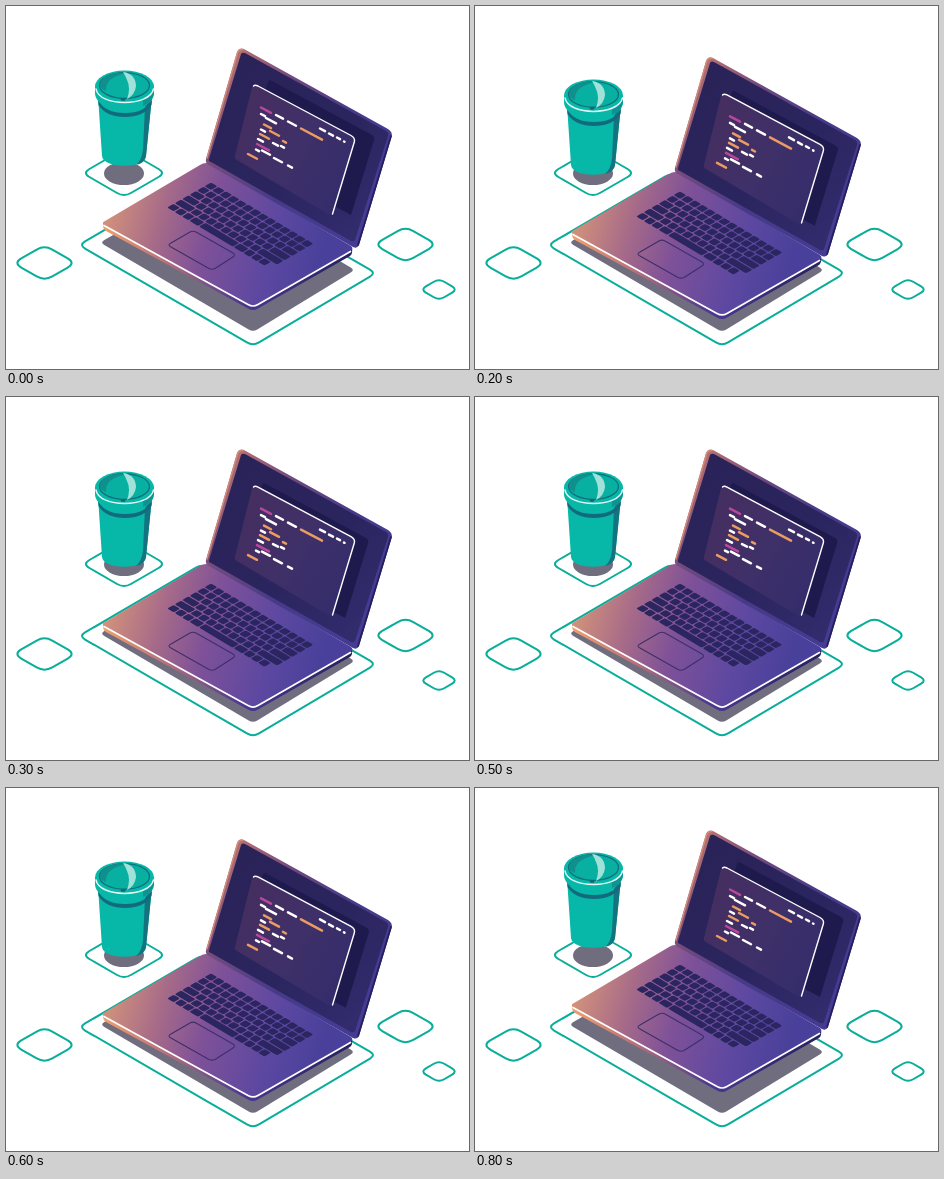
Recreate the animation shown at these times as an HTML page. Size 463 px wide and 363 px high, loop 900 ms.

```html
<!DOCTYPE html>
<html lang="en">
<head>
<meta charset="utf-8">
<title>Floating laptop and cup</title>
<style>
  html, body { margin: 0; width: 100%; height: 100%; overflow: hidden; background: #fff; }
  svg { display: block; width: 100%; height: 100%; }
</style>
</head>
<body>
<svg viewBox="0 0 463 363" fill="none" stroke-linecap="round" stroke-linejoin="round">
  <defs>
    <linearGradient id="deck" gradientUnits="userSpaceOnUse" x1="105" y1="205" x2="315" y2="262">
      <stop offset="0" stop-color="#cf8f7c"/>
      <stop offset=".22" stop-color="#a86c88"/>
      <stop offset=".45" stop-color="#7f5198"/>
      <stop offset=".75" stop-color="#5d48a1"/>
      <stop offset="1" stop-color="#48409a"/>
    </linearGradient>
    <linearGradient id="side" gradientUnits="userSpaceOnUse" x1="97" y1="0" x2="346" y2="0">
      <stop offset="0" stop-color="#f0a06c"/>
      <stop offset=".25" stop-color="#b9707c"/>
      <stop offset=".55" stop-color="#4c3890"/>
      <stop offset="1" stop-color="#262060"/>
    </linearGradient>
    <linearGradient id="lid" gradientUnits="userSpaceOnUse" x1="220" y1="60" x2="365" y2="185">
      <stop offset="0" stop-color="#b57072"/>
      <stop offset=".3" stop-color="#70497f"/>
      <stop offset=".65" stop-color="#463a88"/>
      <stop offset="1" stop-color="#453b92"/>
    </linearGradient>
    <linearGradient id="screen" gradientUnits="userSpaceOnUse" x1="215" y1="70" x2="350" y2="220">
      <stop offset="0" stop-color="#2a2358"/>
      <stop offset=".6" stop-color="#2b255f"/>
      <stop offset="1" stop-color="#322b6c"/>
    </linearGradient>
    <linearGradient id="card" gradientUnits="userSpaceOnUse" x1="235" y1="110" x2="340" y2="175">
      <stop offset="0" stop-color="#452e60"/>
      <stop offset=".5" stop-color="#3f3068"/>
      <stop offset="1" stop-color="#352d6b"/>
    </linearGradient>
  </defs>

  <g id="mats" stroke="#09ae9a" stroke-width="2"></g>
  <path id="shadow" fill="#706e7e"/>
  <ellipse cx="118" cy="167.500" rx="20" ry="11.500" fill="#706e7e"/>

  <g id="cup">
    <path d="M92 90L96 150C97 163 139 163 140 150L146 90Z" fill="#07b8a8"/>
    <path d="M146 90L140 150Q139 157 130 159Q136 154 137 143L139 101Z" fill="#13737f"/>
    <path d="M92 94Q99 107 119 107T146 94L145.500 99Q138 111 119 111T92.500 99Z" fill="#126b7c"/>
    <path d="M89 80V87C89 109 148 109 148 87V80Z" fill="#07b8a8"/>
    <path d="M148 80V87Q147 96 137 100V94Q146 89 148 80Z" fill="#0d9492"/>
    <ellipse cx="118.500" cy="80.500" rx="29.500" ry="16" fill="#07b8a8"/>
    <path d="M90 83C93 101 144 101 147.500 83" stroke="#e4f7f3" stroke-width="1.500"/>
    <ellipse cx="118.500" cy="79.500" rx="25" ry="12.800" fill="#07b0a1" stroke="#126f7c" stroke-width="1.300"/>
    <path d="M94 80C94 68 112 66 121 67Q99 71 100 85Q95 83 94 80Z" fill="#118f8d"/>
    <path d="M117 66C126 67 130 73 130 80Q129 89 121 93Q125 82 121 74Q119 69 117 66Z" fill="#a0e2da"/>
    <ellipse cx="117" cy="93.500" rx="2.500" ry="1.200" fill="#126672"/>
  </g>

  <g id="laptop">
    <path d="M97 216V220Q97 223 100 225L242 302.500Q247 305.500 252 302.500L344 250Q347 248 346 241Z" fill="url(#side)"/>
    <path d="M99 215L194 159Q200 155 206 159L345 240Q348 243 344 245L252 298Q247 301 242 298L99 220Q95 217 99 215Z" fill="url(#deck)"/>
    <path d="M98 219.500L242 298.500Q247 301.500 252 298.500L344.500 245.500" stroke="#fff" stroke-width="1.700"/>
    <path d="M184 226Q187 224.500 190 226L227 247Q230 249 227 251L209 262.500Q206 264 203 262.500L165 241Q161 239 165 237Z" stroke="#3d2f69" stroke-width="1.100"/>
    <g id="keys" transform="matrix(.858 .513 -.868 .497 205 176.500)" fill="#2b2560"></g>

    <path d="M200 153L231 46Q233 41 238 43L382 123Q387 126 385.500 131L353 239Q351 243 347 241L203 159Q199 157 200 153Z" fill="url(#lid)"/>
    <path d="M203 153L235 48Q236 46 239 47L380 125Q383 127 382 130L349 234Q348 236 345 235L205 156Q202 155 203 153Z" fill="url(#screen)"/>
    <path d="M201 152L231.500 47Q233 43 237 43.500" stroke="#d28b76" stroke-width="1.400"/>
    <path d="M385 130L352 239" stroke="#241f5e" stroke-width="1.800"/>
    <path id="shade" d="M256 78Q257 75 260 77L360 131Q363 133 362 136L339 211L233 155Z" fill="#1f1a4d"/>
    <path d="M229 150L246 81.500Q248 78 251 79.500L345 129.500Q350 132 348.500 136L327 206Q326 210 322 208L231 154Q228 152 229 150Z" fill="url(#card)"/>
    <path d="M247.500 80Q249 78.500 252 80L345 129.500Q349.500 132 348.300 136L326.500 208" stroke="#fff" stroke-width="1.400"/>
    <g id="code" transform="translate(0 -1)" stroke-width="2.500"></g>
  </g>
</svg>
<script>
const byId = id => document.getElementById(id);

function add(parent, tag, attributes) {
  const node = document.createElementNS("http://www.w3.org/2000/svg", tag);
  for (const name in attributes) node.setAttribute(name, attributes[name]);
  byId(parent).append(node);
}

// Rounded polygon: each corner is cut at a fixed distance and smoothed.
function roundedPath(points, radius) {
  const toward = (a, b) => {
    const k = radius / Math.hypot(b[0] - a[0], b[1] - a[1]);
    return [a[0] + (b[0] - a[0]) * k, a[1] + (b[1] - a[1]) * k];
  };
  return points.map((p, i) => {
    const before = points.at(i - 1), after = points[(i + 1) % points.length];
    return `${i ? "L" : "M"}${toward(p, before)}Q${p} ${toward(p, after)}`;
  }).join("") + "Z";
}

const diamond = (x, y, w, h) => [[x - w, y], [x, y - h], [x + w, y], [x, y + h]];
const mats = [
  [[[73, 239], [196, 167], [370, 267], [247, 340]], 7],
  [diamond(118, 167, 41.5, 24), 8],
  [diamond(38.5, 257, 31, 18), 9],
  [diamond(399.5, 238.5, 31, 18), 9],
  [diamond(433, 283.5, 18.3, 10.8), 6]
];
for (const [points, radius] of mats) add("mats", "path", { d: roundedPath(points, radius) });
byId("shadow").setAttribute("d", roundedPath([[94, 236.5], [200, 176], [349, 264], [247, 326]], 5));

// Key widths per row, in units of one standard key.
const ones = n => Array(n).fill(1);
const keyRows = [
  ones(14),
  ones(14),
  [1.4, ...ones(11), 1.6],
  [1.7, ...ones(10), 2.3],
  [2.1, ...ones(9), 2.9],
  [1, 1, 1, 1.3, 4.7, 1.3, 1, 1, 1]
];
const KEY = 8.6, ROW = 8.6, GAP = 1.2;
keyRows.forEach((widths, row) => {
  let x = 0;
  for (const width of widths) {
    add("keys", "rect", { x, y: row * ROW, width: width * KEY - GAP, height: ROW - GAP, rx: 1.5 });
    x += width * KEY;
  }
});

const palette = { w: "#fff", o: "#ea9c62", p: "#b9479c" };
const dashes = [
  ["p", 255, 102.5, 10], ["w", 270, 110, 7], ["w", 282, 116.5, 8], ["o", 295, 123.5, 21],
  ["w", 314, 123.5, 5], ["w", 323, 128.5, 4], ["w", 331, 132.5, 3], ["w", 338, 136.5, .5],
  ["w", 255, 109, 4], ["w", 260, 113, 10],
  ["o", 258, 119.5, 7], ["o", 264, 126, 9], ["o", 277, 136, 3],
  ["w", 255, 124.5, 4], ["o", 254, 129, 9], ["w", 267, 138, 5],
  ["w", 252, 134, 5], ["p", 251, 139, 12], ["w", 275, 141, 3],
  ["w", 250, 144.5, 3], ["w", 256, 145.5, 8], ["w", 268, 153, 8], ["w", 282, 160.5, 4],
  ["o", 242, 149, 9]
];
for (const [color, x, y, length] of dashes) {
  add("code", "path", { d: `M${x} ${y}l${length} ${length * .53}`, stroke: palette[color] });
}

const STEP = 100, STEPS = 9, DROP = 10.2;

function draw() {
  const step = Math.floor(performance.now() / STEP) % STEPS;
  const progress = 1 - Math.abs(step - 4) / 4;
  const eased = 1 - (1 - progress) ** 3;
  const drop = `translate(0 ${DROP * eased})`;
  byId("cup").setAttribute("transform", drop);
  byId("laptop").setAttribute("transform", drop);
  byId("shade").setAttribute("transform", `translate(${6 * (1 - eased)} ${-2 * (1 - eased)})`);
  requestAnimationFrame(draw);
}
draw();
</script>
</body>
</html>
```
